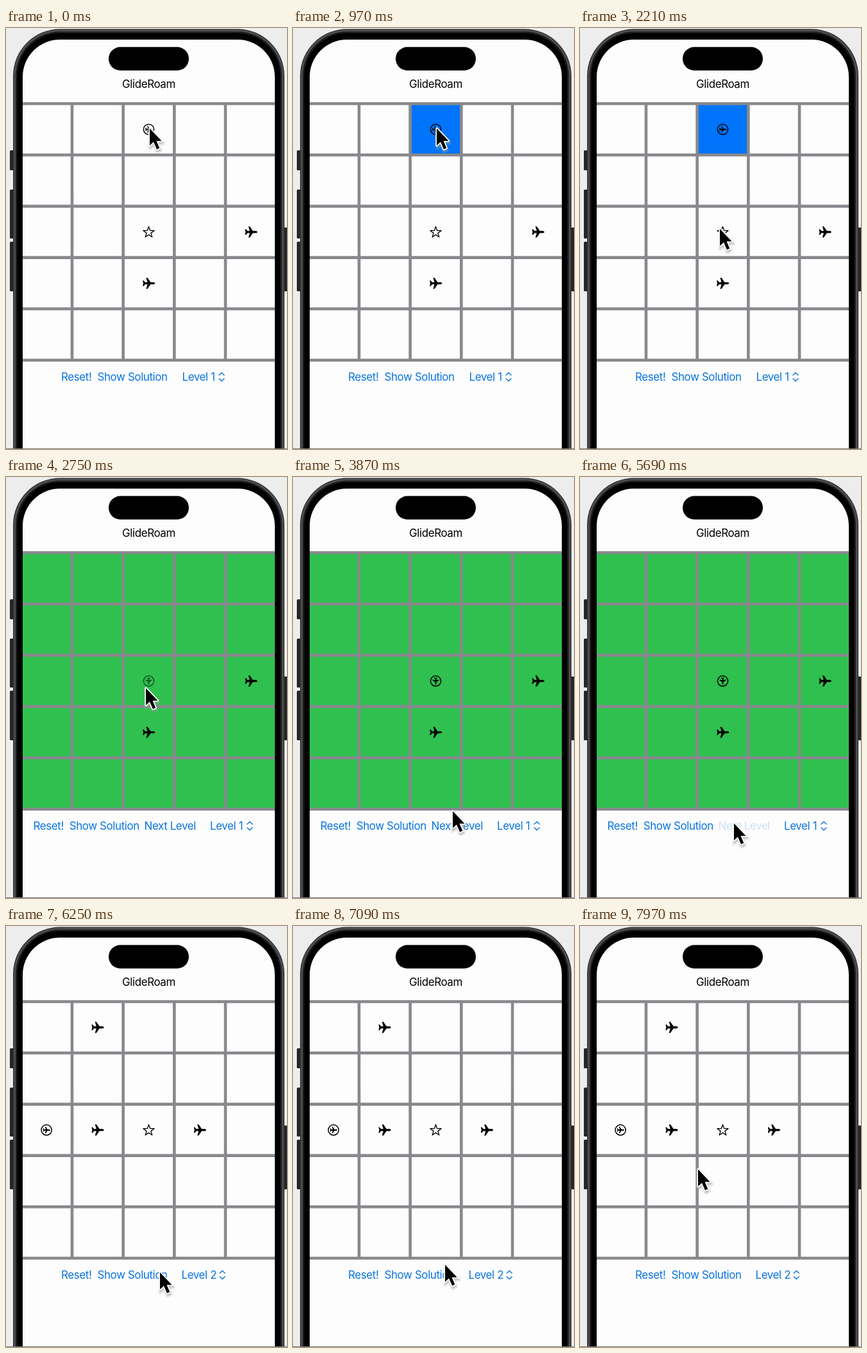
Recreate the animation shown at these times as an HTML page. Size 438x654 px, loop 8 s.

```html
<!DOCTYPE html>
<html lang="en">
<head>
<meta charset="utf-8">
<title>GlideRoam</title>
<style>
  html, body { margin: 0; width: 100%; height: 100%; overflow: hidden; background: #ededed; }
  svg { display: block; width: 438px; height: 654px; }
  text { font: 17px Inter, Roboto, sans-serif; letter-spacing: -.43px; }
  .link { fill: #0a74e0; }
  .caret, .line { fill: none; stroke-linecap: round; stroke-linejoin: round; }
  .caret { stroke: #0a74e0; stroke-width: 1.4; }
  .line { stroke: #000; stroke-width: 1.5; }
</style>
</head>
<body>
<svg viewBox="0 0 438 654">
  <defs>
    <clipPath id="screen"><rect x="26" y="18" width="393" height="720" rx="58"/></clipPath>
    <filter id="soft" x="-50%" y="-50%" width="200%" height="200%"><feGaussianBlur stdDeviation="1.8"/></filter>
    <path id="plane" d="M9.8 0C9.8-1 8.6-1.7 7-1.7H2.9L-1.7-8.3Q-2-8.7-2.5-8.7H-3.6Q-4.1-8.7-3.9-8.1L-2-1.7H-5.7L-7.5-4Q-7.8-4.4-8.3-4.4H-9Q-9.4-4.4-9.3-3.9L-8.4 0L-9.3 3.9Q-9.4 4.4-9 4.4H-8.3Q-7.8 4.4-7.5 4L-5.7 1.7H-2L-3.9 8.1Q-4.1 8.7-3.6 8.7H-2.5Q-2 8.7-1.7 8.3L2.9 1.7H7C8.6 1.7 9.8 1 9.8 0Z"/>
    <g id="pawn"><circle class="line" r="8.1"/><use href="#plane" transform="scale(.58)"/></g>
    <path id="star" class="line" style="stroke-width:1.3"/>
    <path id="carets" class="caret" d="M-4-2.7L0-6.5L4-2.7M-4 2.7L0 6.5L4 2.7"/>
    <path id="arrow" d="M0 0V26.5L6 21L11 32.5L15.3 30.6L10.5 19.5H18.6Z"/>
  </defs>

  <g fill="#262628">
    <rect x="6" y="190" width="8" height="31" rx="1.5"/>
    <rect x="6" y="251" width="8" height="76" rx="1.5"/>
    <rect x="6" y="332" width="8" height="77" rx="1.5"/>
    <rect x="430" y="310" width="9" height="99" rx="1.5"/>
  </g>
  <rect x="11" y="1.5" width="423" height="760" rx="73" fill="#343436"/>
  <rect x="12.5" y="3" width="420" height="760" rx="71.5" fill="#505052"/>
  <rect x="15" y="5.5" width="415" height="760" rx="69" fill="#1e1e20"/>
  <rect x="17.5" y="8" width="410" height="760" rx="66.5"/>
  <rect x="26" y="18" width="393" height="720" rx="58" fill="#fdfdfd"/>
  <rect x="160" y="29.5" width="125" height="36.5" rx="18.2"/>
  <text x="222.5" y="93" text-anchor="middle">GlideRoam</text>

  <g clip-path="url(#screen)">
    <rect id="field" x="26" y="117" width="393" height="400" fill="#2fc04f"/>
    <rect id="selected" x="184" y="119" width="77" height="77" fill="#0074fa"/>
    <path id="grid" fill="none" stroke="#88888d" stroke-width="4.6"/>
  </g>
  <g id="pieces"></g>
  <g id="menu"></g>
  <rect y="653" width="438" height="1" fill="#777"/>

  <g id="cursor">
    <use href="#arrow" x="1" y="3" fill="#999" stroke="#999" stroke-width="4" opacity=".6" filter="url(#soft)"/>
    <use href="#arrow" fill="#000" stroke="#fff" stroke-width="3.4" stroke-linejoin="round" style="paint-order:stroke"/>
  </g>
</svg>
<script>
const LOOP = 8000, PITCH = 79.7, FADE = 250;
const SELECT = 550, SOLVE = 2640, ADVANCE = 5900;
const $ = id => document.getElementById(id);

// [time, x, y] of the pointer tip
const pointerPath = [
  [0, 224, 156], [1000, 224, 156], [2090, 218, 312], [2260, 218, 312],
  [2500, 218, 328], [3030, 218, 328], [3770, 249, 519], [3900, 249, 519],
  [4560, 245, 532], [5000, 241, 540], [5400, 240, 538], [6700, 240, 538],
  [7130, 237, 526], [7950, 184, 378], [LOOP, 184, 378]
];

const clamp = v => Math.max(0, Math.min(1, v));
const ease = v => v * v * (3 - 2 * v);
const pressOpacity = (t, down, up) =>
  1 - .8 * clamp((t - down) / FADE) + .8 * clamp((t - up) / FADE);

const piece = (name, row, col, turn = 0, id = '') =>
  `<g id="${id}" transform="translate(${222.5 + PITCH * (col - 2)} ${157.5 + PITCH * row}) rotate(${turn})"><use href="#${name}"/></g>`;
const link = (label, x, id = '') => `<text id="${id}" class="link" x="${x}" y="548">${label}</text>`;
const picker = (level, x, caretX) =>
  link('Level ' + level, x) + `<use href="#carets" x="${caretX}" y="542"/>`;

const levelOne = piece('plane', 2, 4) + piece('plane', 3, 2);
const scenes = {
  play: {
    pieces: levelOne + piece('pawn', 0, 2, 0, 'mover') + piece('star', 2, 2, 0, 'goal'),
    menu: link('Reset!', 86) + link('Show Solution', 142.5) + picker(1, 274.5, 336)
  },
  solved: {
    pieces: levelOne + piece('pawn', 2, 2, 90, 'goal'),
    menu: link('Reset!', 42.5) + link('Show Solution', 98.7) +
      link('Next Level', 215.5, 'next') + picker(1, 318, 380)
  },
  levelTwo: {
    pieces: piece('plane', 0, 1) + piece('plane', 2, 1) + piece('plane', 2, 3) +
      piece('pawn', 2, 0) + piece('star', 2, 2),
    menu: link('Reset!', 86) + link('Show Solution', 142.5) + picker(2, 273.5, 337.3)
  }
};

const starPoints = Array.from({ length: 10 }, (_, i) => {
  const r = i % 2 ? 3.6 : 9, a = i * Math.PI / 5;
  return `${r * Math.sin(a)} ${.6 - r * Math.cos(a)}`;
});
$('star').setAttribute('d', 'M' + starPoints.join('L') + 'Z');

let lines = '';
for (let i = 0; i < 6; i++) {
  lines += `M26 ${117.5 + PITCH * i}H419`;
  lines += `M${222.5 + PITCH * (i - 2.5)} 115.2V518.3`;
}
$('grid').setAttribute('d', lines);

let current;
function showScene(name) {
  if (name === current) return;
  current = name;
  $('pieces').innerHTML = scenes[name].pieces;
  $('menu').innerHTML = scenes[name].menu;
  $('field').style.display = name === 'solved' ? '' : 'none';
}

function movePointer(t) {
  const i = pointerPath.findIndex(p => p[0] > t);
  const [t0, x0, y0] = pointerPath[i - 1], [t1, x1, y1] = pointerPath[i];
  const k = ease((t - t0) / (t1 - t0));
  $('cursor').setAttribute('transform', `translate(${x0 + (x1 - x0) * k} ${y0 + (y1 - y0) * k})`);
}

function draw(t) {
  showScene(t < SOLVE ? 'play' : t < ADVANCE ? 'solved' : 'levelTwo');
  $('selected').style.display = t >= SELECT && t < SOLVE ? '' : 'none';
  if (current === 'play') $('mover').style.opacity = pressOpacity(t, 20, SELECT);
  if (current !== 'levelTwo') $('goal').style.opacity = pressOpacity(t, 2340, SOLVE);
  if (current === 'solved') $('next').style.opacity = pressOpacity(t, 5430, ADVANCE);
  movePointer(t);
}

const start = performance.now();
function tick() {
  draw((performance.now() - start) % LOOP);
  requestAnimationFrame(tick);
}
tick();
</script>
</body>
</html>
```
